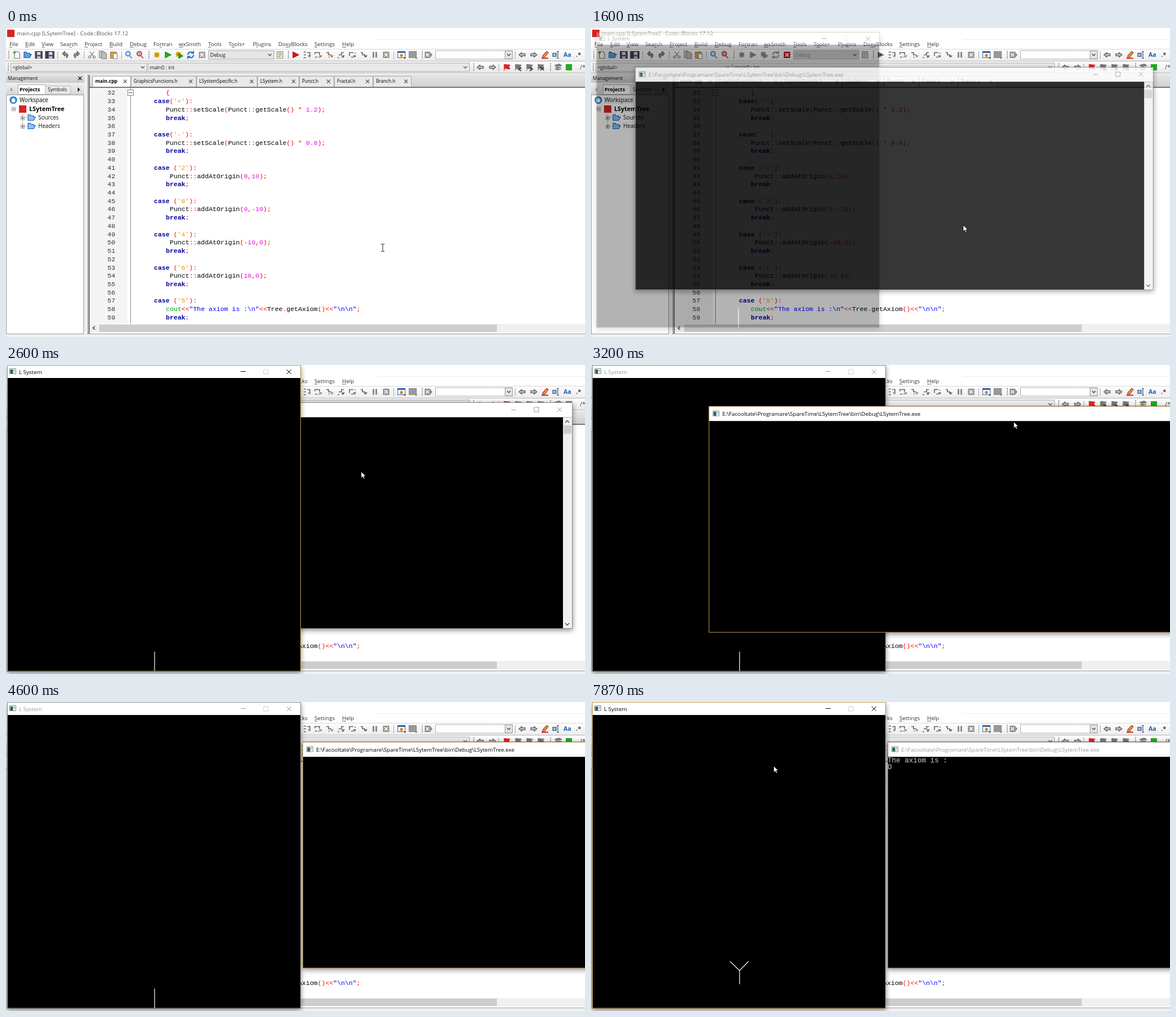
An HTML page with a canvas for the animation above (8 s loop, 1025 by 547 pixels).

```html
<!DOCTYPE html>
<html lang="en">
<head>
<meta charset="utf-8">
<title>L System</title>
<style>
html, body { margin: 0; width: 100%; height: 100%; overflow: hidden; background: #fff }
canvas, svg { position: absolute; left: 0; top: 0 }
text { font: 9.75px 'Open Sans', sans-serif; fill: currentColor }
.term { font: 12.6px 'Liberation Mono', monospace; fill: #ccc; white-space: pre }
.frame { filter: drop-shadow(0 3px 5px #0007) }
.btn { fill: none; stroke: currentColor }
</style>
</head>
<body>
<canvas id="ide" width="1025" height="547"></canvas>
<svg width="1025" height="547">
  <defs>
    <g id="icon">
      <path d="M.5.5h11v9H.5z" fill="#fff" stroke="#888"/>
      <path d="M1.5 2h5v7h-5z" fill="#27605f"/><path d="M8 2h2v4H8z" fill="#9bb"/>
    </g>
    <path id="min" d="M-4.5.5h9"/>
    <path id="max" d="M-4-4h8v8h-8z"/>
    <path id="close" d="M-4-4l8 8m0-8l-8 8"/>
  </defs>
  <g id="tree">
    <rect class="frame" width="520" height="542.5"/>
    <rect x=".5" y=".5" width="519" height="22.5" fill="#fff"/>
    <use href="#icon" x="4" y="6"/><text x="21" y="15.5">L System</text>
    <g class="btn"><use href="#min" x="418" y="11"/><use href="#max" x="458" y="12" stroke="#ccc"/><use href="#close" x="499" y="12"/></g>
    <path id="plant" fill="none" stroke="#eee" stroke-width="1.3"/>
    <rect class="edge" x=".5" y=".5" width="519" height="541.5" fill="none"/>
  </g>
  <g id="console">
    <rect class="frame" width="932" height="400.5"/>
    <rect x=".5" y=".5" width="931" height="26" fill="#fff"/>
    <use href="#icon" x="7" y="8"/><text x="24" y="17">E:\Facooltate\Programare\SpareTime\LSytemTree\bin\Debug\LSytemTree.exe</text>
    <g class="btn"><use href="#min" x="828" y="13"/><use href="#max" x="868" y="13"/><use href="#close" x="909" y="13"/></g>
    <path d="M915 26.5h16V400h-16z" fill="#f0f0f0"/><path d="M916 41h14v15h-14z" fill="#cdcdcd"/>
    <path d="M919 36l3.5-3.5L926 36m-7 355l3.5 3.5 3.5-3.5" fill="none" stroke="#444" stroke-width="1.3"/>
    <path id="caret" d="M1 35h7v3.5H1z" fill="#eee"/>
    <g id="output"><text class="term" x="0" y="36">The axiom is :</text><text class="term" x="0" y="48">O</text></g>
    <rect class="edge" x=".5" y=".5" width="931" height="400" fill="none"/>
  </g>
  <path id="ibeam" d="M-3-6.5h2.2l.8.8.8-.8H3M0-6V6m-3 .5h2.2L0 5.7l.8.8H3" fill="none" stroke="#222"/>
  <path id="arrow" d="M0 0V11L2.6 8.7 4.4 12.6 6.2 11.8 4.5 8H8Z" fill="#fff" stroke="#000" stroke-width=".7"/>
</svg>
<script>
const $ = id => document.getElementById(id);
const c = $('ide').getContext('2d');
const MONO = "'Liberation Mono', monospace", SANS = "'Open Sans', sans-serif";

function box(x, y, w, h, fill, stroke) {
  c.fillStyle = fill;
  c.fillRect(x, y, w, h);
  if (stroke) { c.lineWidth = 1; c.strokeStyle = stroke; c.strokeRect(x + .5, y + .5, w - 1, h - 1); }
}
function shade(x, y, w, h, top, bottom) {
  const fill = c.createLinearGradient(0, y, 0, y + h);
  fill.addColorStop(0, top);
  fill.addColorStop(1, bottom);
  box(x, y, w, h, fill);
}
function text(s, x, y, size = 9.75, color = '#111', weight = '', family = SANS) {
  c.font = `${weight} ${size}px ${family}`;
  c.fillStyle = color;
  c.fillText(s, x, y + size * .35);
}
// Shapes are given around their own centre.
function shape(x, y, d, stroke, fill, width = 1.2) {
  const p = new Path2D(d);
  c.save();
  c.translate(x, y);
  c.lineWidth = width;
  if (fill) { c.fillStyle = fill; c.fill(p); }
  if (stroke) { c.strokeStyle = stroke; c.stroke(p); }
  c.restore();
}
const GEAR = 'M-5 0H5M0-5V5M-4-4L4 4M4-4L-4 4M3 0A3 3 0 1 1-3 0A3 3 0 1 1 3 0';
const PLAY = 'M-4-5L6 0L-4 5Z', PAGE = 'M-4-6H2L5-3V6H-4Z', DISK = 'M-6-6H6V6H-6Z';
const CROSS = 'M-3-3L3 3M3-3L-3 3', CHEVRON = 'M-3-1.5L0 1.5L3-1.5';
const LENS = 'M3-2A4 4 0 1 1-5-2A4 4 0 1 1 3-2M2 2L6 6';
const BACK = 'M-6 0L-1-4V-2H5V2H-1V4Z', FORTH = 'M6 0L1-4V-2H-5V2H1V4Z';
const FOLDER = 'M-6 5V-5H-2L-1-3H4V-1H7L4 5Z', FLAG = 'M-5-5L5-4L3-1L5 3L-5 2V6Z';
const STEPS = [
  'M-6-5H-2M-6 0H-2M-6 5H-2M0-4H5V2', 'M-6-1V-4H2V0M-6 4H-2M0 4H2', 'M-6-4H-2V0H3M-2 4H0',
  'M5-4H1V0H-4M-6 5H-3M1 4H5', 'M-5 2V-4H2M-2 4H2M4-3H6M4 3H6', 'M-5-4H-2V0H2V4'];

function grip(x, y) { for (let i = 0; i < 5; i++) box(x - 1, y - 7 + i * 3, 2, 1.5, '#888'); }
function combo(x, y, w, fill, label, color) {
  box(x, y - 8, w, 16, fill, '#adadad');
  shape(x + w - 8, y, CHEVRON, '#444');
  text(label, x + 3.5, y, 8.8, color);
}

function toolbars(running) {
  const y = 47.5, off = '#8a8a8a', dark = '#444';
  const pick = color => running ? off : color;
  shade(0, 38, 1025, 21, '#fdfdfd', '#ececec');
  shade(0, 60, 1025, 20, '#fdfdfd', '#e6e6e6');
  box(0, 37, 1025, 1, '#d8d8d8');
  box(0, 58, 1025, 1, '#bbb');
  box(0, 79, 1025, 1, '#bbb');

  shape(19, y, PAGE, '#777', '#fff');
  shape(15, y - 4, 'M-3 0H3M0-3V3', '#5a3', null, 2);
  shape(38, y, FOLDER, '#1d5c9b', '#57a2e6');
  [58, 76, 79].forEach(x => {
    shape(x, y, DISK, '#222', '#556');
    shape(x, y, 'M-3-5H3V0H-3ZM-3 3H3V6H-3Z', null, '#dde');
  });
  shape(105, y, 'M-5-2L-1-6V-3C6-3 6 2 2 5C3 1 1 0-1 0V2Z', '#555', '#999');
  shape(125, y, 'M5-2L1-6V-3C-6-3-6 2-2 5C-3 1-1 0 1 0V2Z', '#555', '#999');
  shape(152, y, 'M-4-6L3 3M4-6L-3 3M-2 4A2 2 0 1 1-6 4A2 2 0 1 1-2 4M6 4A2 2 0 1 1 2 4A2 2 0 1 1 6 4', '#777');
  shape(169, y - 1, PAGE, '#888', '#ccc');
  shape(173, y + 1, PAGE, '#888', '#bbb');
  shape(190, y, 'M-5-5H5V6H-5Z', '#96711f', '#cfa64a');
  shape(193, y + 2, 'M-3-4H4V5H-3Z', '#888', '#fff');
  shape(217, y, LENS, '#3a78c0', '#bfe0ff', 1.6);
  shape(237, y, LENS, '#a33', '#e9a', 1.6);

  shape(267, y, GEAR, pick('#c90'), pick('#fd5'), 1.6);
  shape(286, y, PLAY, pick('#080'), pick('#0b2'));
  shape(305, y - 1, GEAR, pick('#c90'), null, 1.3);
  shape(309, y + 2, 'M-3-4L4 0L-3 4Z', pick('#080'), pick('#0b2'));
  shape(327, y, 'M-5 0A5 5 0 0 1 4-3M5 0A5 5 0 0 1-4 3M1-3H5V-7M-1 3H-5V7', pick('#26c'), null, 2);
  shape(347, y, 'M-5-5H5V5H-5Z', running ? '#a00' : off, running ? '#d22' : '#aaa');
  shape(347, y, CROSS, '#fff', null, 1.6);
  combo(358, y, 117, running ? '#ccc' : '#e6e6e6', 'Debug', running ? '#888' : '#111');
  shape(485, y, 'M-5-6H5V6H-5Z', '#888', running ? '#ccc' : '#eee');
  shape(485, y, 'M-3-3H3M-3 0H3M-3 3H1', running ? '#888' : '#861');

  shape(512, y, PLAY, pick('#a00'), running ? '#444' : '#d11');
  STEPS.forEach((d, i) => {
    const x = 533 + i * 20;
    shape(x, y, d, '#666', null, 1.7);
    shape(x + 4, y + 2, 'M-3-1L0 3L3-1Z', null, i < 3 ? pick('#b63') : '#666');
  });
  shape(653, y, 'M-2.5-5V5M2.5-5V5', off, null, 3);
  shape(673, y, 'M-5-5H5V5H-5Z', off, '#999');
  shape(673, y, CROSS, '#fff', null, 1.5);
  box(693, 41, 14, 12, '#fff', '#2a62b0');
  box(693, 41, 14, 3, '#2a62b0');
  shape(700, 48.5, 'M-3 0H3M0-3V3M-2-2L2 2M2-2L-2 2', '#d70');
  shape(706, 53, 'M-2-1H2L0 2Z', null, '#333');
  box(713, 41, 14, 12, '#999', '#888');
  shape(726, 53, 'M-2-1H2L0 2Z', null, '#666');
  shape(748, y, 'M-6-5H2L6 0L2 5H-6Z', '#777', '#999');
  shape(746, y, CROSS, '#fff');
  combo(760, y, 137, '#fff', '');
  box(883, 40, 14, 15, '#e4e4e4', '#999');
  shape(890, y, CHEVRON, '#333');
  shape(914, y, BACK, '#555', '#bbb');
  shape(934, y, FORTH, '#555', '#bbb');
  shape(954, y, 'M-4 2L3-6L6-4L0 4L-4 5Z', '#942', '#e94');
  shape(954, y, 'M-6 6H6', '#d22', null, 2);
  shape(974, y, 'M-6-3H0V3H-6ZM3-6V6M1-6H5M1 6H5', '#357', '#9bd');
  text('Aa', 987, y, 10.5, '#1c5ea8', 'bold');
  text('.*', 1009, y, 11, dark, 'bold');

  combo(8, 69.5, 242, '#e9e9e9', '<global>');
  combo(251, 69.5, 570, '#e9e9e9', 'main() : int');
  shape(840, 69.5, BACK, '#555', '#bbb');
  shape(861, 69.5, FORTH, '#555', '#bbb');
  ['#d22', '#777', '#777', '#777'].forEach((color, i) => {
    shape(887 + i * 20, 69.5, FLAG, color, color);
    if (i) shape(889 + i * 20, 72, ['', 'M3-2L-2 1L3 4', 'M-2-2L3 1L-2 4', CROSS][i], '#333', null, 1.5);
  });
  shape(977, 69, 'M-5-3L2-5L6-3L-1-1ZM-5 0L-1 2L6 0M-5 3L-1 5L6 3', '#555', '#a96');
  box(991, 64, 11, 11, '#2a2');
  text('/*', 1016, 69.5, 11, dark);

  [5, 253, 500, 737].forEach(x => grip(x, y));
  [4, 828, 964].forEach(x => grip(x, 69.5));
  [91, 138, 204, 686, 901].forEach(x => box(x, 41, 1, 14, '#aaa'));
  box(872, 63, 1, 14, '#aaa');
}

function management() {
  shade(0, 81, 139, 16, '#e6e6e6', '#c9c9c9');
  text('Management', 3, 88.5, 8.6);
  shape(131, 89, CROSS, '#222', null, 1.5);
  shade(0, 98, 138, 20, '#eee', '#d6d6d6');
  box(21, 100, 49, 18, '#fff', '#aaa');
  box(69, 102, 46, 15, '#e8e8e8', '#bbb');
  text('Projects', 24, 109, 9, '#000', 'bold');
  text('Symbols', 74, 109, 8.65);
  shape(9, 109, 'M2-4V4L-2 0Z', null, '#999');
  shape(129, 109, 'M-2-4V4L2 0Z', null, '#111');
  box(0, 118, 138, 424, '#fff', '#999');
  box(23, 121, 53, 13, '#f2f2f2');
  shape(13, 127.5, 'M6 0A6 6 0 1 1-6 0A6 6 0 1 1 6 0', '#1b67b5', '#3b8fdd');
  shape(13, 127.5, 'M-4 0L0-4L4 0H3V4H-3V0Z', null, '#fff');
  text('Workspace', 24, 128, 9.9);
  text('LSytemTree', 41, 143.5, 10.7, '#000', 'bold');
  box(23, 137, 13, 13, '#d22');
  shape(13.5, 149, 'M16 3V25M16 9H24M16 25H24', '#bbb', null, 1);
  [[13, 143], [29, 159], [29, 174]].forEach(([x, y], i) => {
    box(x - 3, y - 3, 7, 7, '#fff', '#999');
    shape(x + .5, y + .5, i ? 'M-2 0H2M0-2V2' : 'M-2 0H2', '#333', null, 1);
    if (i) {
      shape(45, y - .5, FOLDER, '#1d5fb0', '#8cc4f2');
      text(['', 'Sources', 'Headers'][i], 57, y, 9.9);
    }
  });
}

const TOKENS = [
  [/^"[^"]*"/, '#0000ff'], [/^'[^']*'/, '#e0a000'], [/^(case|break)/, '#0000a0', 'bold'],
  [/^cout/, '#00a000'], [/^\d[\d.]*/, '#f000f0'], [/^\w+/, '#000'], [/^\s+/, '#000'], [/^./, '#ff0000']];
function codeLine(s, x, y) {
  while (s) {
    const [re, color, weight] = TOKENS.find(([re]) => re.test(s));
    const word = s.match(re)[0];
    text(word, x, y, 11.48, color, weight, MONO);
    x += word.length * 6.89;
    s = s.slice(word.length);
  }
}
function editor() {
  shade(146, 82, 879, 23, '#e6e6e6', '#cfcfcf');
  const tabs = [['main.cpp', 153], ['GraphicsFunctions.h', 221], ['LSystemSpecific.h', 337], ['LSystem.h', 445],
    ['Punct.h', 519], ['Fractal.h', 581], ['Branch.h', 650], ['', 718]];
  tabs.slice(0, -1).forEach(([name, x], i) => {
    const end = tabs[i + 1][1];
    box(x, 85, end - x, 20, i ? '#e9e9e9' : '#fff', '#aaa');
    text(name, x + 5, 94, i ? 8.2 : 8.5, '#000', i ? '' : 'bold');
    shape(end - 10, 94.5, CROSS, '#555', null, 1.1);
  });
  box(146, 104, 879, 438, '#fff');
  box(148, 106, 67, 417, '#f4f4f4');
  box(146, 104, 879, 2, '#777');
  box(144, 82, 1, 460, '#999');
  box(146, 83, 2, 458, '#666');

  c.save();
  c.beginPath();
  c.rect(148, 106, 877, 417);
  c.clip();
  const keys = { 41: ['2', '0,10'], 45: ['8', '0,-10'], 49: ['4', '-10,0'], 53: ['6', '10,0'] };
  const lines = {
    32: [283, '{'],
    33: [262, "case('+'):"], 34: [283, 'Punct::setScale(Punct::getScale() * 1.2);'],
    37: [262, "case('-'):"], 38: [283, 'Punct::setScale(Punct::getScale() * 0.8);'],
    57: [262, "case ('5'):"], 58: [283, String.raw`cout<<"The axiom is :\n"<<Tree.getAxiom()<<"\n\n";`]
  };
  for (const n in keys) {
    lines[n] = [262, `case ('${keys[n][0]}'):`];
    lines[+n + 1] = [290, `Punct::addAtOrigin(${keys[n][1]});`];
  }
  for (let n = 35; n < 60; n += 4) lines[n] = [283, 'break;'];
  for (let n = 32; n <= 60; n++) {
    const y = 114.4 + (n - 32) * 14.72;
    text(n, 179.5, y, 11.48, '#333', '', MONO);
    if (lines[n]) codeLine(lines[n][1], lines[n][0], y);
  }
  c.restore();
  box(220, 106, 1, 417, '#888');
  box(215, 109, 11, 11, '#fff', '#888');
  box(217, 114, 7, 1, '#555');

  box(148, 524, 877, 15, '#f0f0f0');
  box(165, 525, 704, 13, '#cdcdcd');
  shape(155.5, 531, 'M2-3L-1.5 0L2 3', '#333', null, 1.5);
  box(143, 541, 882, 1, '#999');
}

function drawIde(running) {
  box(0, 0, 1025, 547, '#f0f0f0');
  box(0, 0, 1025, 38, '#fff');
  box(658, 20, 367, 1, '#ececec');
  box(2, 3, 13, 13, '#d22');
  text('main.cpp [LSytemTree] - Code::Blocks 17.12', 19, 10, 9.75, running ? '#888' : '#555');
  const menu = [['&File', 6], ['&Edit', 34], ['&View', 63], ['Sea&rch', 96], ['&Project', 139], ['&Build', 183],
    ['&Debug', 219], ['Fo&rtran', 261], ['&wxSmith', 306], ['&Tools', 358], ['T&ools+', 394], ['P&lugins', 437],
    ['Do&xyBlocks', 482], ['&Settings', 546], ['&Help', 595]];
  for (const [label, x] of menu) {
    const [head, tail] = label.split('&');
    text(head + tail, x, 28.5, 9.75, '#333');
    box(x + c.measureText(head).width, 33.5, c.measureText(tail[0]).width, 1, '#666');
  }
  toolbars(running);
  management();
  editor();
}

const clamp = v => Math.min(1, Math.max(0, v));
const span = (t, a, b) => clamp((t - a) / (b - a));
const lerp = (a, b, p) => a + (b - a) * p;
const smooth = p => p * p * (3 - 2 * p);
const show = (el, on) => el.setAttribute('visibility', on ? 'visible' : 'hidden');
const move = (el, x, y) => el.setAttribute('transform', `translate(${x} ${y})`);

// While opening, a window fades in and grows about an anchor point inside it.
function place(el, [x, y], [anchorX, anchorY], startScale, open, active) {
  const s = lerp(startScale, 1, open);
  el.setAttribute('transform', `translate(${x + anchorX * (1 - s)} ${y + anchorY * (1 - s)}) scale(${s})`);
  el.setAttribute('opacity', open);
  el.style.color = active ? '#000' : '#999';
  el.querySelector('.edge').setAttribute('stroke', active ? '#c09a50' : '#8c8c8c');
}

let wasRunning;
function render(t) {
  const running = t >= 930;
  if (running !== wasRunning) drawIde(wasRunning = running);

  const consoleActive = t >= 2900 && t < 5470;
  const drag = span(t, 3070, 3670), back = smooth(span(t, 3830, 4330));
  const x = lerp(71, 542, 1 - (1 - drag) ** 1.4) - 17 * back;
  const y = 66 + 4.5 * drag + 9 * Math.sin(Math.PI * drag);
  place($('console'), [x, y], [466, 200], .93, span(t, 1330, 1676), consoleActive);
  place($('tree'), [2, 0], [208, 210], .95, span(t, 1530, 1770), !consoleActive);
  const front = $(consoleActive || t < 1670 ? 'console' : 'tree');
  if (front.nextElementSibling !== $('ibeam')) $('ibeam').before(front);

  show($('caret'), consoleActive && (t - 2570) % 1060 < 530);
  show($('output'), t >= 7070);
  const presses = [6270, 6400, 6530, 6670, 6800].filter(at => t >= at).length;
  const top = 507.5 - presses * 8.67;
  $('plant').setAttribute('d', t < 7870
    ? `M261 ${top}V${Math.min(542, top + 35)}` : 'M261 499.5V475.5L244 459M261 475.5L277 459');

  const glide = smooth(span(t, 80, 270));
  show($('ibeam'), t < 670);
  move($('ibeam'), lerp(667, 660, glide), lerp(389, 349.5, glide));
  show($('arrow'), t >= 1270);
  const reach = smooth(span(t, 2220, 2870)), cross = smooth(span(t, 4550, 5400));
  if (t < 3070) move($('arrow'), lerp(659, 611, reach), lerp(349, 94, reach));
  else move($('arrow'), lerp(x + 540, 323.5, cross), lerp(y + 28, 113.5, cross));
}
function tick(now) {
  render(now % 8000);
  requestAnimationFrame(tick);
}
requestAnimationFrame(tick);
</script>
</body>
</html>
```
